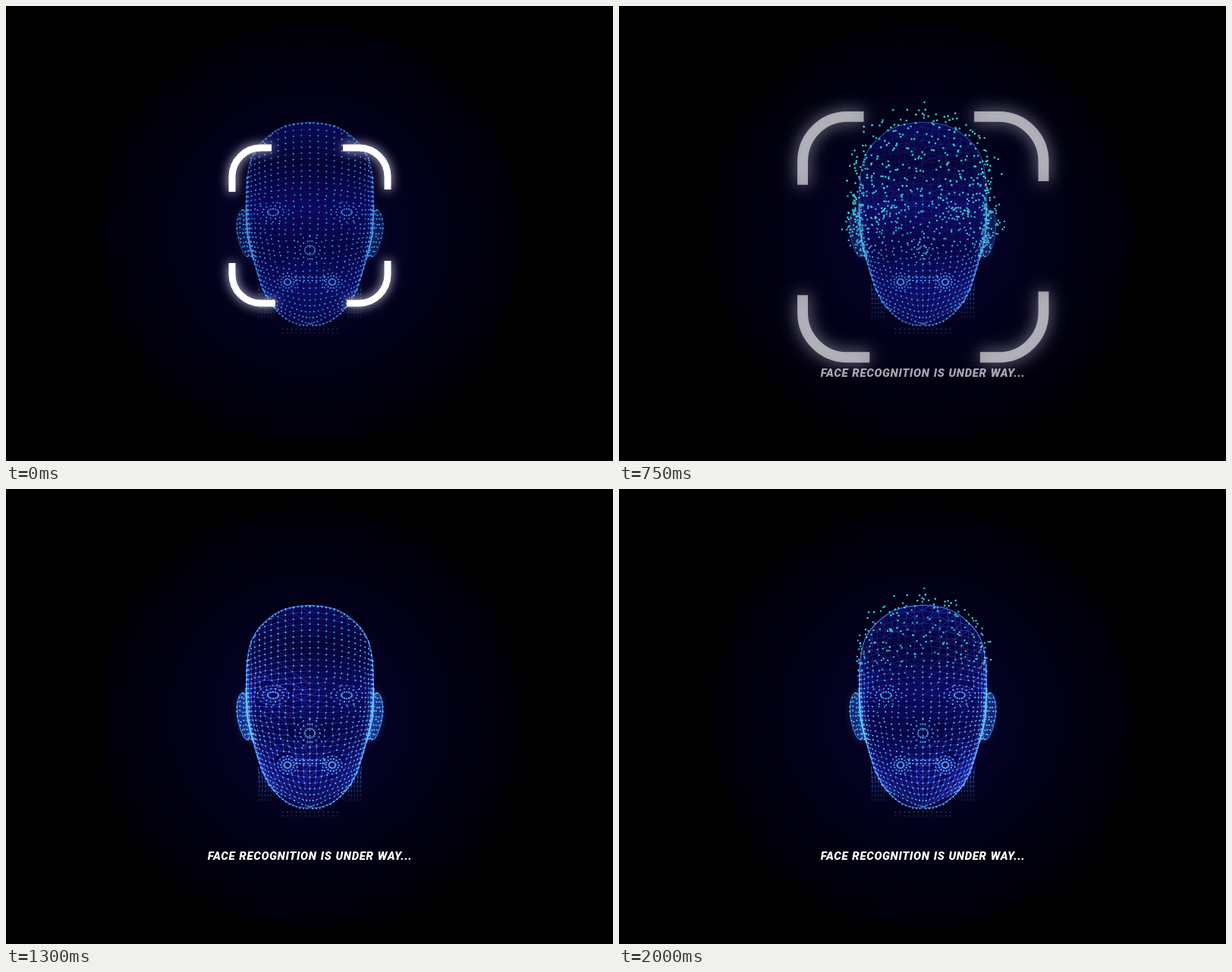
An HTML page with a canvas that plays this animation: 800x600 px, repeating every 2.05 s.

```html
<!DOCTYPE html>
<html lang="en">
<head>
<meta charset="utf-8">
<title>Face recognition</title>
<style>
html, body { margin: 0; width: 100%; height: 100%; overflow: hidden; background: #000; }
canvas { position: absolute; left: 0; top: 0; display: block; }
#label {
  position: absolute; left: 0; top: 474px; width: 801px;
  text-align: center; white-space: nowrap; color: #fff;
  font: italic 900 15px/20px Roboto, "Liberation Sans", sans-serif;
  letter-spacing: .62px; word-spacing: .8px;
}
</style>
</head>
<body>
<canvas id="stage" width="800" height="600"></canvas>
<div id="label">FACE RECOGNITION IS UNDER WAY...</div>
<script>
const ctx = document.getElementById('stage').getContext('2d');
const label = document.getElementById('label');
const LOOP = 2050, STEP = 50, CX = 400.5, TAU = Math.PI * 2;

let seed = 77;
const rnd = () => (seed = (seed * 16807) % 2147483647) / 2147483647;
const clamp = v => Math.max(0, Math.min(1, v));
const ramp = (t, a, b) => clamp((t - a) / (b - a));
const mix = (a, b, k) => a + (b - a) * k;
const bell = (v, c, s) => Math.exp(-(((v - c) / s) ** 2));
const rgb = (a, b, k) => 'rgb(' + a.map((v, i) => Math.round(mix(v, b[i], k))) + ')';

// Half width of the head at each height
const PROFILE = [[153, 0], [155, 22], [160, 38], [167, 50], [182, 67], [200, 78], [225, 83], [262, 84],
  [300, 83], [325, 77], [350, 70], [372, 63], [390, 54], [405, 41], [415, 28], [420, 14], [421, 0]];
const EAR = [[483, 275], [490, 267], [496, 277], [497, 297], [493, 316], [486, 331], [478, 331]];
// Ringed features: centre, radii, rings
const FEATURES = [[400.5, 322, 20, 18, 3], [371, 364, 13, 12, 3], [430, 364, 13, 12, 3],
  [352, 272, 21, 13, 3], [449, 272, 21, 13, 3]];

function halfWidth(y) {
  for (let i = 1; i < PROFILE.length; i++) {
    const [y0, w0] = PROFILE[i - 1], [y1, w1] = PROFILE[i];
    if (y <= y1) return mix(w0, w1, clamp((y - y0) / (y1 - y0)));
  }
  return 0;
}

function smooth(pts, closed) {
  const path = new Path2D(), n = pts.length;
  const mid = i => {
    const a = pts[i % n], b = pts[(i + 1) % n];
    return [(a[0] + b[0]) / 2, (a[1] + b[1]) / 2];
  };
  path.moveTo(...(closed ? mid(0) : pts[0]));
  for (let i = 1; i < (closed ? n + 1 : n - 1); i++) path.quadraticCurveTo(...pts[i % n], ...mid(i));
  if (!closed) path.lineTo(...pts[n - 1]);
  return path;
}

const flip = ([x, y]) => [2 * CX - x, y];
const right = PROFILE.map(([y, w]) => [CX + w, y]);
const headPath = smooth([...right, ...right.slice(1, -1).reverse().map(flip)], true);
const sides = [1, -1].map(s => ({
  x: CX + s * 90,
  ear: smooth(s > 0 ? EAR : EAR.map(flip), true),
  rim: smooth([262, 275, 290, 305, 320, 334].map(y => [CX + s * halfWidth(y), y]))
}));

const dots = [], edges = [];

function addDot(x, y, glow = 0, dim = 1) {
  const a = rnd() * TAU, m = (3 + 17 * Math.pow(rnd(), 1.2)) * dim;
  const ox = (x - CX) / 90, oy = Math.min(0, (y - 290) / 135);
  const out = 7 * Math.pow(Math.hypot(ox, oy), 3) * dim;
  const dot = { x, y, dim, glow: (.65 + .35 * rnd() + glow) * dim,
    dx: Math.cos(a) * m + ox * out, dy: Math.sin(a) * m * (y > 380 ? .6 : 1) + oy * out };
  dots.push(dot);
  return dot;
}

const link = (a, b) => a && b && edges.push([a, b]);
const inFeature = (x, y) => FEATURES.some(([fx, fy, rx, ry]) => Math.hypot((x - fx) / rx, (y - fy) / ry) < 1.12);

// Curved rows; columns run straight up over the forehead
function buildHead() {
  const ROWS = 35, K = 12, grid = [];
  for (let r = 0; r < ROWS; r++) {
    const v = r / (ROWS - 1), row = [];
    for (let c = -K; c <= K; c++) {
      const s = Math.sin(c / K * Math.PI / 2);
      const y = mix(155, 419, v) + 22 * Math.cos(Math.PI * v) * s * s;
      const w = halfWidth(y), x = CX + (y < 225 ? 84 : w) * s;
      const rough = c && y > 235 && y < 350 ? 3 * (1 - s ** 6) : .5;
      const hidden = Math.abs(x - CX) > w + .5 || (c && inFeature(x, y));
      row.push(hidden ? null : addDot(x + (c ? (rnd() - .5) * rough : 0), y + (rnd() - .5) * rough));
    }
    grid.push(row);
  }
  for (let r = 0; r < ROWS; r++) for (let c = 0; c <= 2 * K; c++) {
    const p = grid[r][c];
    link(p, grid[r][c + 1]);
    if (r < ROWS - 1) {
      link(p, grid[r + 1][c]);
      if ((r + c) % 2) link(p, grid[r + 1][c + (c < K ? 1 : -1)]);
    }
  }
}

function buildFeatures() {
  for (const [fx, fy, rx, ry, rings] of FEATURES) {
    const n = 14;
    let inner = null;
    for (let k = 1; k <= rings; k++) {
      const ring = [];
      for (let i = 0; i < n; i++) {
        const a = (i + k % 2 * .5) / n * TAU, f = k / rings;
        ring.push(addDot(fx + Math.cos(a) * rx * f, fy + Math.sin(a) * ry * f));
      }
      ring.forEach((p, i) => {
        link(p, ring[(i + 1) % n]);
        if (inner) link(p, inner[i]);
      });
      inner = ring;
    }
  }
  for (const y of [358, 362]) {
    let last = null;
    for (let x = 382; x <= 420; x += 5.4) {
      const p = addDot(x, y, .2);
      link(last, p);
      last = p;
    }
  }
}

function buildOutline() {
  for (let i = 1; i < PROFILE.length; i++) {
    const [y0, w0] = PROFILE[i - 1], [y1, w1] = PROFILE[i];
    const n = Math.ceil(Math.hypot(y1 - y0, w1 - w0) / 6.5);
    for (let j = 0; j < n; j++) for (const s of [1, -1])
      addDot(CX + s * (mix(w0, w1, j / n) - .8), mix(y0, y1, j / n) + .8);
  }
}

function buildEars() {
  for (const s of [1, -1]) for (let j = 0; j < 11; j++) {
    const v = j / 10, y = mix(269, 330, v);
    const inner = halfWidth(y) - 3;
    const outer = mix(89, 82, v * v) + 8.5 * Math.sin(Math.PI * Math.pow(v, .8));
    let last = null;
    for (let i = 0; i < 5; i++) {
      const x = mix(inner, outer, i / 4) + (i < 4 ? rnd() * 2 - 1 : 0);
      const p = addDot(CX + s * x, y + (i < 4 ? rnd() * 3 - 1.5 : 0), .15);
      link(last, p);
      last = p;
    }
  }
}

function buildNeck() {
  for (const s of [1, -1]) for (let y = 374; y < 412; y += 6)
    for (let x = 67; x > 47; x -= 4) if (x > halfWidth(y) + 2) addDot(CX + s * x, y, 0, .5 * (1.1 - (y - 374) / 50));
  for (let x = -36; x <= 36; x += 6) {
    addDot(CX + x, 426, 0, .35);
    addDot(CX + x, 431, 0, .25);
  }
}

buildHead();
buildFeatures();
buildOutline();
buildEars();
buildNeck();

// Scatter sweeps down the head, each dot flying out and settling back
function scatter(y, t) {
  const pulse = start => {
    const from = start + (y - 150) / .95, k = ramp(t, from, from + 440);
    return Math.pow(Math.sin(Math.PI * Math.pow(k, .75)), 1.4);
  };
  return Math.max(pulse(550), pulse(1890));
}

function wave(x, y, t) {
  const p = t / 260;
  return .5 + .25 * Math.sin(x / 31 + p + 4) + .25 * Math.sin(y / 37 - p * 1.3 + Math.sin(x / 45 - p));
}

// Brow, mouth and crown catch more light than forehead and cheeks
const relief = y => .4 + .5 * bell(y, 262, 20) + .6 * bell(y, 372, 30) + .2 * bell(y, 160, 18);

function drawBack() {
  ctx.fillStyle = '#000';
  ctx.fillRect(0, 0, 800, 600);
  const g = ctx.createRadialGradient(400, 300, 60, 400, 300, 288);
  g.addColorStop(0, 'rgb(5,2,42)');
  g.addColorStop(.5, 'rgb(2,1,22)');
  g.addColorStop(.9, 'rgb(0,0,9)');
  g.addColorStop(1, '#000');
  ctx.fillStyle = g;
  ctx.fillRect(100, 0, 600, 600);
}

function drawBody(t, live) {
  const g = ctx.createLinearGradient(0, 153, 0, 421);
  g.addColorStop(0, 'rgb(8,10,84)');
  g.addColorStop(.2, 'rgb(5,4,52)');
  g.addColorStop(.42, 'rgb(12,9,92)');
  g.addColorStop(.62, 'rgb(7,5,66)');
  g.addColorStop(.82, 'rgb(12,12,98)');
  g.addColorStop(1, 'rgb(8,8,70)');
  ctx.fillStyle = g;
  ctx.fill(headPath);
  for (const side of sides) {
    ctx.fillStyle = `rgba(30,70,190,${.25 + .5 * live * wave(side.x, 300, t)})`;
    ctx.fill(side.ear);
  }

  const n = ctx.createLinearGradient(0, 365, 0, 414);
  n.addColorStop(0, `rgba(60,90,255,${mix(.25, .75, live)})`);
  n.addColorStop(1, 'rgba(50,80,220,0)');
  ctx.strokeStyle = n;
  ctx.lineWidth = 1;
  ctx.beginPath();
  for (const s of [1, -1]) for (let i = 0; i < 6; i++) {
    ctx.moveTo(CX + s * (68 - i * 4), 366 + i * 5);
    ctx.lineTo(CX + s * (66 - i * 4), 392);
    ctx.lineTo(CX + s * (68 - i * 4), 414);
  }
  ctx.stroke();
}

function drawWire(t, live) {
  const LEVELS = 8, paths = Array.from({ length: LEVELS }, () => new Path2D());
  const at = p => {
    const e = .2 * scatter(p.y, t);
    return [p.x + p.dx * e, p.y + p.dy * e];
  };
  for (const [a, b] of edges) {
    const k = Math.min(LEVELS - 1, Math.floor(wave(a.x, a.y, t) * relief(a.y) * 1.25 * LEVELS));
    paths[k].moveTo(...at(a));
    paths[k].lineTo(...at(b));
  }
  ctx.lineWidth = .9;
  paths.forEach((p, k) => {
    ctx.strokeStyle = `rgba(72,82,255,${(.1 + .8 * k / LEVELS) * live + .06})`;
    ctx.stroke(p);
  });
}

function drawRim(t, live) {
  ctx.lineWidth = 1.2;
  ctx.strokeStyle = `rgba(85,130,255,${mix(.35, .85, live)})`;
  ctx.stroke(headPath);
  ctx.save();
  ctx.shadowColor = 'rgb(70,150,255)';
  ctx.shadowBlur = 6;
  for (const side of sides) {
    const w = wave(side.x, 300, t);
    ctx.lineWidth = 1.2;
    ctx.strokeStyle = `rgba(110,170,255,${mix(.25, .35 + .5 * w, live)})`;
    ctx.stroke(side.ear);
    ctx.lineWidth = 1.8;
    ctx.strokeStyle = `rgba(150,215,255,${mix(.4, .6 + .4 * w, live)})`;
    ctx.stroke(side.rim);
  }
  ctx.restore();
}

function drawDots(t, live) {
  const rest = [mix(66, 92, live), mix(160, 196, live), mix(240, 255, live)];
  for (const p of dots) {
    const e = scatter(p.y, t), r = mix(1.1, 1.35, e);
    ctx.globalAlpha = clamp(mix(p.glow, p.dim, e * .6));
    ctx.fillStyle = rgb(rest, [56, 212, 215], clamp(e * 1.3));
    ctx.beginPath();
    ctx.arc(p.x + p.dx * e, p.y + p.dy * e, r, 0, TAU);
    ctx.fill();
  }
  ctx.globalAlpha = 1;
}

function corner(x, y, sx, sy, armX, armY) {
  const r = 38;
  ctx.moveTo(x, y + sy * armY);
  ctx.lineTo(x, y + sy * r);
  ctx.arcTo(x, y, x + sx * r, y, r);
  ctx.lineTo(x + sx * armX, y);
}

function drawBrackets(t) {
  const k = ramp(t, 550, 900);
  if (k >= 1) return;
  const z = 1 + .96 * k;
  ctx.save();
  ctx.translate(400, 262);
  ctx.scale(z, z);
  ctx.translate(-400, -262);
  ctx.globalAlpha = 1 - .72 * k;
  if (k > .7) ctx.globalAlpha *= (1 - k) / .3;
  ctx.lineWidth = 9;
  ctx.strokeStyle = '#fff';
  ctx.shadowColor = 'rgb(215,215,240)';
  ctx.shadowBlur = 14 * z;
  ctx.beginPath();
  corner(298, 187, 1, 1, 52, 58);
  corner(503, 187, -1, 1, 59, 55);
  corner(298, 392, 1, -1, 57, 53);
  corner(503, 392, -1, -1, 54, 56);
  ctx.stroke();
  ctx.restore();
}

function draw(t) {
  const live = ramp(t, 500, 1250);
  drawBack();
  drawBody(t, live);
  drawWire(t, live);
  drawRim(t, live);
  drawDots(t, live);
  drawBrackets(t);
  label.style.opacity = ramp(t, 50, 1130);
}

const begin = performance.now();
function tick() {
  const t = (performance.now() - begin) % LOOP;
  draw(Math.floor(t / STEP) * STEP);
  requestAnimationFrame(tick);
}
tick();
</script>
</body>
</html>
```
